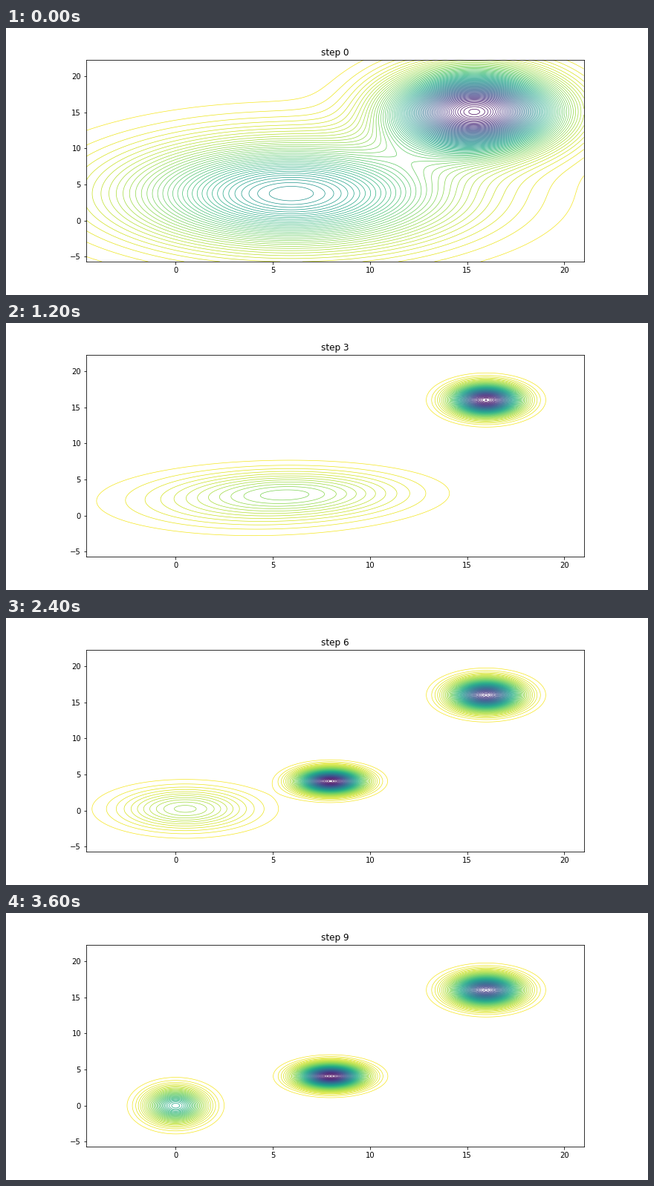
Animation of 864x360 px, one loop 4 s. Source, as a matplotlib script:

```python
import numpy as np
import matplotlib.pyplot as plt
from matplotlib.animation import FuncAnimation

STEPS = 10
LEVELS = 70

X, Y = np.meshgrid(np.linspace(-4.6, 21.0, 250), np.linspace(-5.68, 22.25, 250))


def vec(x, y):
    return np.array([x, y])


def ease(step, start, end):
    """Smoothstep from 0 at start to 1 at end."""
    u = np.clip((step - start) / (end - start), 0, 1)
    return u * u * (3 - 2 * u)


def settle(step, first, last, rate):
    """Geometric decay from first towards last."""
    return last + (first - last) * rate ** step


def mix(a, b, t):
    return a + (b - a) * t


def components(step):
    """Weight, mean and spread of the three clusters at one fitting step."""
    # The lower two start as one broad cluster that splits along a line.
    hub = settle(step, vec(5.95, 3.75), vec(5.05, 2.52), .02)
    broad = vec(5.42, 4.76)
    rate = vec(.12, .23)
    w = .2 + .0017 * step + .1 * (1 - ease(step, 3.5, 7))

    low_spread = settle(step, broad, vec(4.05, 2.38), rate)
    mid_spread = settle(step, broad, vec(3.85, 2.08), rate)
    low = (w,
           mix(hub, vec(0, 0), ease(step, 1, 7.2)),
           mix(low_spread, vec(.958, 1.504), ease(step, 4, 7.5)))
    mid = (.58 - w,
           mix(hub, vec(7.97, 4.08), ease(step, .9, 5)),
           mix(mid_spread, vec(1.01, 1.0187), ease(step, 2.35, 5.3)))
    high = (.42,
            settle(step, vec(15.38, 15.12), vec(15.97, 16.02), .02),
            settle(step, vec(2.70, 3.54), vec(1.074, 1.309), vec(.1, .125)))
    return low, mid, high


def gaussian(weight, mean, spread):
    q = ((X - mean[0]) / spread[0]) ** 2 + ((Y - mean[1]) / spread[1]) ** 2
    return weight / (2 * np.pi * spread.prod()) * np.exp(-q / 2)


fig, ax = plt.subplots(figsize=(12, 5), dpi=72)
fig.subplots_adjust(left=.125, right=.9, bottom=.125, top=.88)


def draw(step):
    density = sum(gaussian(*c) for c in components(step))
    ax.cla()
    ax.contour(X, Y, -density, LEVELS, cmap="viridis", linewidths=.7)
    ax.set_title(f"step {step}", fontsize=12)
    return []


anim = FuncAnimation(fig, draw, frames=STEPS, interval=400, repeat=True, repeat_delay=0)
plt.show()
```
